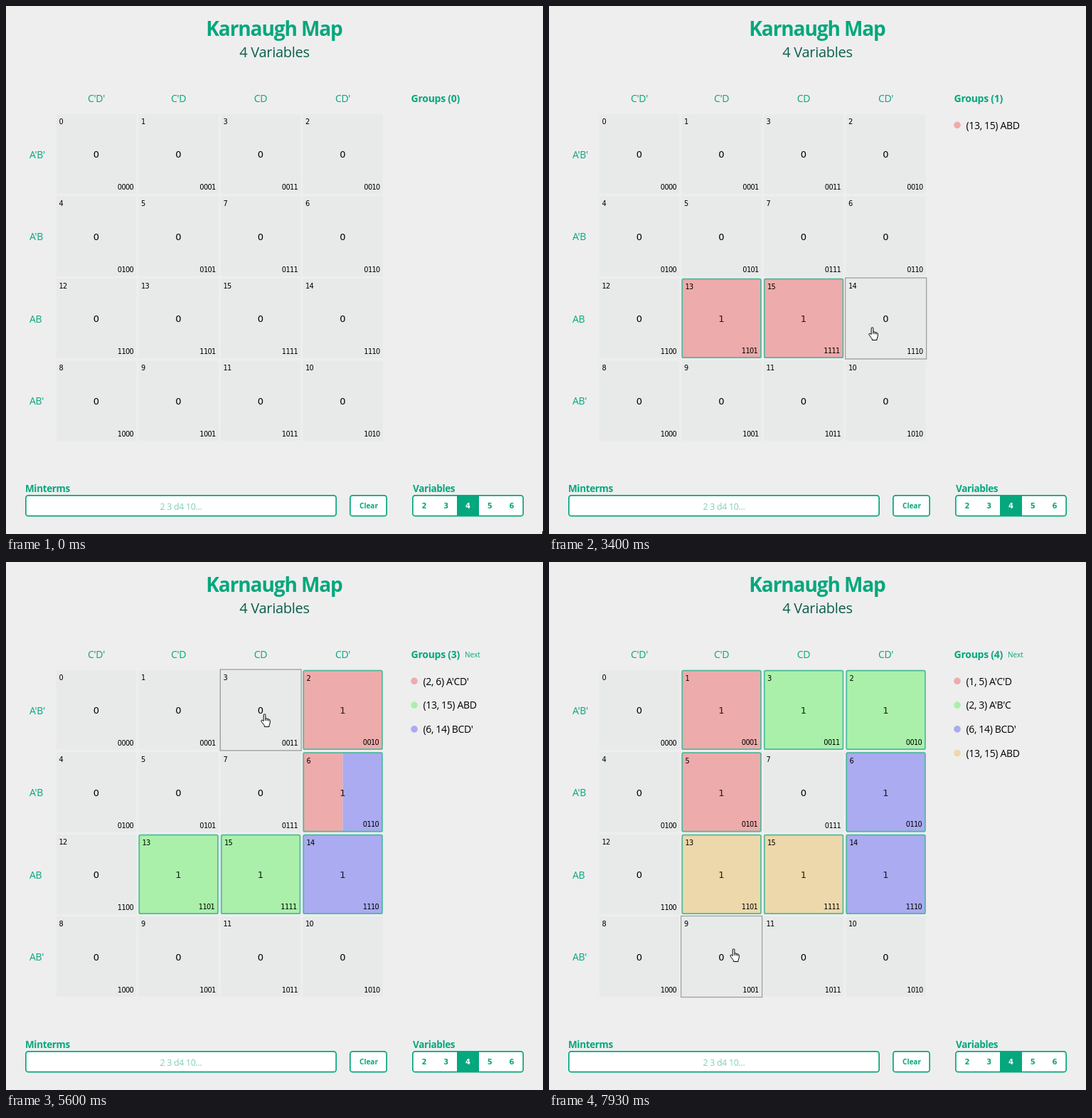
An HTML page for the animation above (8000 ms loop, 755 px wide and 742 px high).

```html
<!DOCTYPE html>
<html lang="en">
<head>
<meta charset="utf-8">
<title>Karnaugh Map</title>
<style>
  html, body { margin: 0; width: 755px; height: 742px; overflow: hidden; background: #eee; }
  svg { display: block; }
  text { font: 14px "Open Sans", "Noto Sans", sans-serif; letter-spacing: -.34px; fill: #000; }
  .g { fill: #05a77d; }
  .b { font-weight: 700; letter-spacing: -.25px; }
  .m { text-anchor: middle; }
  .e { text-anchor: end; }
  .title { font-size: 28px; letter-spacing: -1.1px; }
  .sub { font-size: 20px; letter-spacing: -.28px; fill: #0b5f4c; }
  .cap { font-size: 13.5px; letter-spacing: -.36px; }
  .hint { font-size: 12.3px; letter-spacing: -.25px; fill: #7dd0b9; }
  .btn { font-size: 10px; letter-spacing: 0; }
  .num { font: 700 10px "DejaVu Sans", sans-serif; letter-spacing: 0; }
  .tiny { font: 9.8px "DejaVu Sans", sans-serif; letter-spacing: -.7px; }
  .val { font: 13px "DejaVu Sans", sans-serif; letter-spacing: 0; }
  .box { fill: #fff; stroke: #05a77d; stroke-width: 1.7; }
  .hand, .arrow { fill: #fff; stroke: #000; stroke-width: 1; stroke-linejoin: round; }
</style>
</head>
<body>
<svg id="stage" width="755" height="742" viewBox="0 0 755 742"></svg>
<script>
const LOOP = 8000, TICK = LOOP / 120, PITCH = 115.5;
const GRAY = [0, 1, 3, 2];
const COLORS = ["#eeabab", "#aaf0aa", "#aaabf0", "#edd8ab"];

// [tick, groups, has alternative]
const STATES = [
  [0, []],
  [37, ["(13) ABC'D"]],
  [46, ["(13, 15) ABD"]],
  [54, ["(13, 15) ABD", "(14, 15) ABC"]],
  [64, ["(6, 14) BCD'", "(13, 15) ABD"]],
  [77, ["(2, 6) A'CD'", "(13, 15) ABD", "(6, 14) BCD'"], true],
  [90, ["(2, 3) A'B'C", "(6, 14) BCD'", "(13, 15) ABD"]],
  [99, ["(1, 3) A'B'D", "(2, 6) A'CD'", "(13, 15) ABD", "(6, 14) BCD'"], true],
  [108, ["(1, 5) A'C'D", "(2, 3) A'B'C", "(6, 14) BCD'", "(13, 15) ABD"], true]
];

// [tick, x, y] of the pointer
const PATH = [
  [22, 604, 728], [34, 238, 454], [37, 238, 454], [43, 352, 455], [46, 352, 455],
  [51, 449, 451], [54, 449, 451], [60, 462, 334], [64, 462, 334], [70, 399, 271],
  [74, 438, 214], [77, 438, 214], [84, 358, 213], [89, 358, 213], [92, 288, 211],
  [93, 282, 211], [95, 260, 211], [99, 260, 211], [103, 243, 320], [111, 243, 320],
  [119, 254, 543]
];

const HAND = `<path d="M4.2 10.6V2a1.35 1.35 0 0 1 2.7 0v5.2c.5-.8 2-.7 2.3.4.6-.6 1.9-.4 2.1.7.8-.4 2 .1 2 1.4v3.2c0 1.6-1.3 2.6-1.3 4v1.6H5.4v-1.4C4.6 15.6 1.9 12.6.9 10.8c-.7-1.2.9-2.2 1.9-1.3z"/><path fill="none" d="M6.9 7v3M9.2 7.6v2.6M11.3 8.3v2.2"/>`;
const ARROW = `<path d="M.5.5V16l3.6-3.4 2.4 5.6 2.2-1-2.4-5.4h5z"/>`;

const text = (x, y, s, cls = "") => `<text x="${x}" y="${y}" class="${cls}">${s}</text>`;
const rect = (x, y, w, h, attrs) => `<rect x="${x}" y="${y}" width="${w}" height="${h}" ${attrs}/>`;
const field = (x, w) => rect(x + .85, 687.85, w - 1.7, 28.8, 'rx="3.5" class="box"');

function chrome() {
  let s = text(377, 42, "Karnaugh Map", "g b m title") + text(377.5, 71.5, "4 Variables", "m sub");
  ["C'D'", "C'D", "CD", "CD'"].forEach((l, i) => s += text(127 + PITCH * i, 135, l, "g m"));
  ["A'B'", "A'B", "AB", "AB'"].forEach((l, i) => s += text(33, 213.5 + PITCH * i, l, "g"));
  s += text(27, 683, "Minterms", "g b cap") + text(572, 683, "Variables", "g b cap");
  s += field(27, 438) + field(483, 53) + field(571, 157);
  s += rect(634, 687, 31, 30, 'fill="#05a77d"');
  s += text(246, 707.5, "2 3 d4 10...", "m hint") + text(510, 706, "Clear", "g b m btn");
  for (let n = 2; n < 7; n++) {
    const fill = n === 4 ? "#fff" : "#05a77d";
    s += `<text x="${588 + 30.75 * (n - 2)}" y="706" class="num m" style="fill:${fill}">${n}</text>`;
  }
  return s;
}

const members = g => g.slice(1, g.indexOf(")")).split(", ").map(Number);

function cell(r, c, groups, hover) {
  const n = GRAY[r] * 4 + GRAY[c];
  const left = 69.5 + PITCH * c, top = 150.4 + PITCH * r;
  const x = left + 1.5, y = top + 1.4;
  const fills = COLORS.filter((_, i) => groups[i] && members(groups[i]).includes(n));
  const on = fills.length > 0, d = on ? 1.5 : 0;
  let s = "";
  if (hover) s += rect(left + .75, top + .75, 113.8, 113.8, 'fill="none" stroke="#a0a0a0" stroke-width="1.5"');
  if (on) {
    const w = 112 / fills.length;
    fills.forEach((f, i) => s += rect(x + w * i, y, w, 112.2, `fill="${f}" rx="${fills.length > 1 ? 0 : 2}"`));
    s += rect(x + .8, y + .8, 110.6, 110.6, 'rx="2" fill="none" stroke="#4dbb9e" stroke-width="1.7"');
  } else {
    s += rect(x, y, 112.3, 112.3, 'fill="#e7eae9"');
  }
  s += text(x + 3.5 + d, y + 13.8 + d, n, "tiny");
  s += text(x + 108 - d, y + 106.2 - d, n.toString(2).padStart(4, "0"), "tiny e");
  return s + `<text x="${x + 56}" y="${y + 61.5}" class="val m" fill-opacity="${on ? .85 : 1}">${+on}</text>`;
}

function pointer(t) {
  if (t === 0 || t === 1) return [754, 738];
  if (t === 2) return [749, 734];
  if (t < PATH[0][0]) return null;
  const i = PATH.findIndex(p => p[0] >= t);
  if (i < 1) return PATH[0].slice(1);
  const [t0, x0, y0] = PATH[i - 1], [t1, x1, y1] = PATH[i];
  const u = (t - t0) / (t1 - t0);
  const k = t1 - t0 > 2 ? u * u * (3 - 2 * u) : u;
  return [x0 + (x1 - x0) * k, y0 + (y1 - y0) * k];
}

function scene(t) {
  const [, groups, more] = STATES.filter(s => s[0] <= t).pop();
  const p = pointer(t);
  const col = p ? Math.floor((p[0] + 5 - 69.5) / PITCH) : -1;
  const row = p ? Math.floor((p[1] + 1 - 150.4) / PITCH) : -1;
  let s = "";
  for (let r = 0; r < 4; r++)
    for (let c = 0; c < 4; c++) s += cell(r, c, groups, r === row && c === col);
  s += text(569.5, 135, `Groups (${groups.length})`, "g b");
  if (more) s += text(645, 134, "Next", "g btn");
  groups.forEach((g, i) => {
    const y = 167.3 + 33.8 * i;
    s += `<circle cx="574" cy="${y}" r="4.8" fill="${COLORS[i]}"/>` + text(586.5, y + 5.2, g);
  });
  if (p) {
    const inside = row >= 0 && row < 4 && col >= 0 && col < 4;
    const at = `translate(${Math.round(p[0])} ${Math.round(p[1])})`;
    s += `<g transform="${at}" class="${inside ? "hand" : "arrow"}">${inside ? HAND : ARROW}</g>`;
  }
  return s;
}

const stage = document.getElementById("stage");
stage.innerHTML = chrome() + '<g id="live"></g>';
const live = document.getElementById("live");
let shown = -1, start = null;

function draw(ms) {
  const t = Math.floor(((ms + 4) % LOOP) / TICK);
  if (t === shown) return;
  shown = t;
  live.innerHTML = scene(t);
}

function loop(now) {
  start ??= now;
  draw(now - start);
  requestAnimationFrame(loop);
}
draw(0);
requestAnimationFrame(loop);
</script>
</body>
</html>
```
